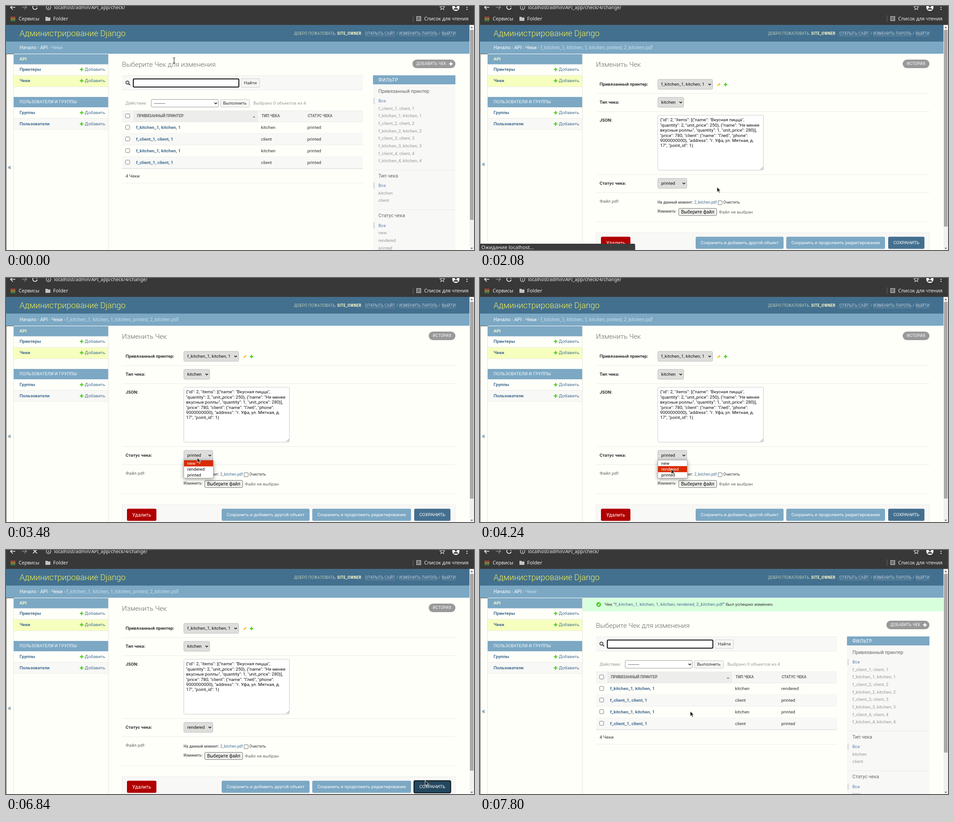
Write an HTML page that moves like this. It is 1033 px wide and 542 px high and loops after 8000 ms.

```html
<!DOCTYPE html>
<html lang="ru">
<head>
<meta charset="utf-8">
<title>Администрирование</title>
<style>
html, body { margin: 0; width: 100%; height: 100%; overflow: hidden; background: #fffffa; }
svg { display: block; width: 1033px; height: 542px; }
text { font-family: Roboto, sans-serif; white-space: pre; }
.ui { font-family: "Noto Sans", "Open Sans", sans-serif; }
.b { font-weight: 700; }
.l { font-weight: 300; }
.s { letter-spacing: .378px; }
.m { text-anchor: middle; }
</style>
</head>
<body>
<svg id="stage" viewBox="0 0 1033 542"></svg>
<script>
const K = 1033 / 1366; // page pixels to stage pixels
const HEAD = '#44708f', BLUE = '#7ca8c4', LINK = '#446e92', PALE = '#f8f8f6',
      LINE = '#ebebe8', DARK = '#333', GREY = '#666', DIM = '#999', PAGE = '#fffffa';

// y is the middle of the capital letters
const T = (x, y, s, fill = DARK, cls = '', n = 13, id = '') =>
  `<text id="${id}" x="${x}" y="${y + n * K * .355}" font-size="${n * K}" fill="${fill}" class="${cls}">${s}</text>`;
const U = (x, y, s, px, id = '') =>
  `<text id="${id}" x="${x}" y="${y + px * .36}" font-size="${px}" fill="#eee" class="ui">${s}</text>`;
const R = (x, y, x2, y2, fill, more = '') =>
  `<rect x="${x}" y="${y}" width="${x2 - x}" height="${y2 - y}" fill="${fill}" ${more}/>`;
const P = (d, stroke, w = 1, fill = 'none') =>
  `<path d="${d}" stroke="${stroke}" stroke-width="${w}" fill="${fill}"/>`;
const C = (x, y, r, fill, more = '') => `<circle cx="${x}" cy="${y}" r="${r}" fill="${fill}" ${more}/>`;
const G = (id, body) => `<g id="${id}">${body}</g>`;
const H = (x, x2, y, c = LINE) => P(`M${x} ${y}H${x2}`, c);
const plus = (x, y, c = '#58cf2c', r = 4) => P(`M${x - r} ${y}h${2 * r}M${x} ${y - r}v${2 * r}`, c, 2.4);
const chevron = (x, y) => P(`M${x - 2.8} ${y - 1.4}l2.8 2.8 2.8 -2.8`, '#222', 1.5);
const check = (x, y) => R(x - 4.5, y - 4.5, x + 4.5, y + 4.5, '#fff', 'rx="1.5" stroke="#777"');
const box = (x, y, x2, y2, fill, stroke, more = '') =>
  R(x + .5, y + .5, x2 - .5, y2 - .5, fill, `rx="2.5" stroke="${stroke}" ${more}`);

function chrome() {
  const colors = ['#e8503a', '#e9b93a', '#4caf50'];
  const dot = (c, i) => [0, 1, 2].map(j => R(10.5 + j * 3.6, 23.8 + i * 3.6, 13 + j * 3.6, 26.3 + i * 3.6, c)).join('');
  return R(0, 0, 1033, 42, '#383838') +
    P('M20.5 3H10.5M15 -2L10 3l5 5', '#eee', 1.6) + P('M35 3H45M40.5 -2L45.5 3l-5 5', '#888', 1.6) +
    G('reload', P('M69 3.5A5 5 0 1 1 67.5 -1', '#eee', 1.6) + P('M69.5 -3v4h-4z', 'none', 0, '#eee')) +
    G('stop', P('M59.5 -1.5l9 9M68.5 -1.5l-9 9', '#eee', 1.7)) +
    C(94, 3, 5, 'none', 'stroke="#ddd" stroke-width="1.2"') + P('M94 2v4M94 -.5v1.3', '#ddd', 1.3) +
    U(106, 3, '', 10.33, 'url') +
    P('M963 -2l1.5 3.5 3.8 .3 -2.9 2.5 .9 3.7 -3.3 -2 -3.3 2 .9 -3.7 -2.9 -2.5 3.8 -.3z', '#ddd', 1.1) +
    C(993, 3, 8, '#eee') + C(993, .8, 2.4, '#383838') + P('M988 8a5 3.6 0 0 1 10 0z', 'none', 0, '#383838') +
    C(1017.5, 3, 1.2, '#eee') + C(1017.5, 7.4, 1.2, '#eee') +
    colors.map(dot).join('') + U(28, 28, 'Сервисы', 10.6) +
    P('M87 24h4l1.5 1.5H98V33H87z', 'none', 0, '#c4c4c4') + U(104, 28, 'Folder', 11.2) +
    P('M898.5 20.5V36', '#666') + R(906.5, 23.5, 915.5, 32.5, 'none', 'stroke="#ddd" stroke-width="1.2"') +
    P('M908 26h2M911 26h3M908 28.2h2M911 28.2h3M908 30.4h2M911 30.4h3', '#ddd') +
    U(923, 28, 'Список для чтения', 10.6);
}

function header() {
  const user = (x, s, cls = 'l', c = '#ffc') => T(x, 61, s, c, 's ' + cls, 11);
  const link = (x, x2, s) => user(x, s, 'l', '#fff') + H(x, x2, 66.5, '#7394ab');
  return R(0, 42, 1023, 79, HEAD) + R(0, 79, 1023, 106, BLUE) +
    T(30, 61, 'Администрирование Django', '#eff25c', 'l', 24) +
    user(636, 'ДОБРО ПОЖАЛОВАТЬ,') + user(731, 'SITE_OWNER', 'b') + user(788, '.') +
    link(793, 859, 'ОТКРЫТЬ САЙТ') + user(862, '/') + link(868, 952, 'ИЗМЕНИТЬ ПАРОЛЬ') +
    user(955, '/') + link(962, 992, 'ВЫЙТИ');
}

function sidebar() {
  const item = (y, s) => T(30, y, s, LINK, 'b') + plus(167, y) + T(174, y, 'Добавить', LINK);
  return R(17, 107, 226, 129.5, BLUE) + T(30, 118, 'API', '#ffc', 'b s', 12) +
    R(17, 154, 226, 179.5, '#f6ffbe') + R(17, 202, 226, 225, BLUE) + R(17, 249, 226, 274, PALE) +
    T(30, 213, 'ПОЛЬЗОВАТЕЛИ И ГРУППЫ', '#fff', 's', 12) +
    [154, 179.5, 249.5, 274.5].map(y => H(17, 226, y)).join('') +
    item(141, 'Принтеры') + item(166, 'Чеки') + item(237, 'Группы') + item(262, 'Пользователи') +
    P('M16.5 107V542M226 107V542', '#e4e4e0') + P('M.5 542V106.5H17', '#555') +
    G('fold', T(4, 357, '«', LINK, '', 22));
}

function crumbs(tail) {
  const w = s => `<tspan fill="#fff">${s}</tspan>`;
  return T(30, 92, `${w('Начало')} › ${w('API')} › ${tail ? w('Чеки') + ' › ' + tail : 'Чеки'}`, '#c8dfea', '', 14);
}

function filters() {
  const printers = [1, 2, 3, 4].flatMap(i => [`f_client_${i}, client, ${i}`, `f_kitchen_${i}, kitchen, ${i}`]);
  const part = (y, name, items) => T(822, y, name, GREY, '', 14) +
    R(811, y + 15, 814, y + 29, '#ddd') +
    ['Все', ...items].map((s, i) => T(822, y + 21.7 + i * 16.65, s, i ? DIM : '#5a7fae')).join('');
  return R(810, 154, 992, 560, PALE) + R(810, 154, 992, 174, BLUE) + T(822, 164, 'ФИЛЬТР', '#fff', 's', 14) +
    part(189, 'Привязанный принтер', printers) + H(810, 992, 364.5) +
    part(377, 'Тип чека', ['kitchen', 'client']) + H(810, 992, 452.5) +
    part(465.5, 'Статус чека', ['new', 'rendered', 'printed']);
}

function list() {
  const row = i => {
    const y = 270 + i * 25.8, kind = i % 2 ? 'client' : 'kitchen';
    return (i % 2 ? R(256, y - 13, 788, y + 12.8, PALE) : '') + H(256, 788, y + 13) + check(268.5, y - .5) +
      T(287, y, `f_${kind}_1, ${kind}, 1`, LINK, 'b', 13, 'link' + i) +
      T(563, y, kind) + T(665, y, 'printed', DARK, '', 13, 'state' + i);
  };
  const th = (x, s) => T(x, 244.5, s, GREY, 'b', 11);
  return T(256, 130, 'Выберите Чек для изменения', GREY, 'l', 20) +
    R(897, 119, 992, 138, DIM, 'rx="9.5"') + T(906, 128.5, 'ДОБАВИТЬ ЧЕК', '#fff', 's', 11) + plus(982, 128.5, '#fff') +
    R(256, 154, 788, 187, PALE) + H(256, 788, 154.5) + H(256, 788, 186.5) +
    C(268, 170, 3.4, 'none', 'stroke="#444" stroke-width="1.8"') + P('M270.5 172.5l3.5 3.5', '#444', 2.2) +
    box(281, 162, 514, 180, '#fff', '#ccc') + G('ring', R(281, 162, 514, 180, 'none', 'rx="2" stroke="#111" stroke-width="2"')) +
    G('caret', P('M285.5 165.5V177', '#222')) +
    box(518, 161, 560, 181, '#f6f6f4', '#ccc') + T(525, 171, 'Найти') +
    T(264, 216, 'Действие:', DIM) + box(320, 207, 469, 225, '#fff', '#999') + T(327, 216, '---------', '#111') + chevron(463, 216) +
    box(473, 207, 538, 225, '#f6f6f4', '#ccc', 'id="run"') + T(479, 216, 'Выполнить') +
    T(546, 216, 'Выбрано 0 объектов из 4', DIM) +
    R(256, 232, 788, 257, '#f6f6f4') + R(281, 232, 556, 257, '#ededeb') + H(256, 788, 232.5) + H(256, 788, 257.5) +
    check(268.5, 244) + th(289, 'ПРИВЯЗАННЫЙ ПРИНТЕР') + th(564, 'ТИП ЧЕКА') + th(666, 'СТАТУС ЧЕКА') +
    P('M544.5 248l3 -4 3 4z', 'none', 0, DIM) +
    [0, 1, 2, 3].map(row).join('') + H(256, 788, 361.5, '#ddd') + T(264, 377.5, '4 Чеки') + H(256, 788, 393.5) + filters();
}

function form() {
  const label = (y, s) => T(264, y, s, DARK, 'b');
  const select = (y, x2, s, id) => box(392, y - 11.5, x2, y + 11.5, '#dededc', '#bbb') +
    T(400, y, s, '#111', '', 13, id) + chevron(x2 - 7, y);
  const button = (x, x2, s, c, n = 13) => R(x, 512.5, x2, 539.5, c, 'rx="3"') + T((x + x2) / 2, 526, s, '#fff', 'm', n);
  const json = ['{"id": 2, "items": [{"name": "Вкусная пицца",', '"quantity": 2, "unit_price": 250}, {"name": "Не менее',
    'вкусные роллы", "quantity": 1, "unit_price": 280}],', '"price": 780, "client": {"name": "Глеб", "phone":',
    '9000000000}, "address": "г. Уфа, ул. Мятная, д.', '17", "point_id": 1}'];
  return T(256, 130, 'Изменить Чек', GREY, 'l', 20) +
    R(933, 119, 992, 138, DIM, 'rx="9.5"') + T(942, 128.5, 'ИСТОРИЯ', '#fff', 's', 11) +
    [194.5, 234.5, 374.5, 414.5, 479.5].map(y => H(256, 992, y)).join('') +
    label(174, 'Привязанный принтер:') + select(174, 514, 'f_kitchen_1, kitchen, 1') +
    P('M524 178l1 -3 4 -4 2 2 -4 4z', 'none', 0, '#e9c91c') + plus(542, 174.5) +
    label(214, 'Тип чека:') + select(214, 450, 'kitchen') +
    label(254, 'JSON:') + box(392, 242, 626, 365, '#fff', '#ccc') + P('M619 363.5l6 -6M622.5 363.5l2.5 -2.5', '#777') +
    json.map((s, i) => T(397.5, 253 + i * 11.34, s, '#111')).join('') +
    label(394, 'Статус чека:') + select(394, 457, 'printed', 'value') +
    G('focus', R(393, 383, 457, 405, 'none', 'rx="2.5" stroke="#111" stroke-width="2"')) +
    T(264, 434, 'Файл pdf:', GREY) + T(392, 436.5, 'На данный момент:', GREY, 'b', 11) +
    T(473, 436.5, '2_kitchen.pdf', LINK, '', 11) + check(530, 437) + T(537, 436.5, 'Очистить', DARK, '', 11) +
    T(392, 456, 'Изменить:', GREY, 'b', 11) + box(438, 449, 523, 466, '#efefed', '#777') +
    T(480.5, 457.5, 'Выберите файл', '#111', 'm', 13.333) + T(527, 458, 'Файл не выбран', GREY) +
    R(256.5, 503.5, 991.5, 560, PALE, `stroke="${LINE}"`) + button(267, 332, 'Удалить', '#b00000', 14) +
    button(476, 670, 'Сохранить и добавить другой объект', BLUE) +
    button(676, 894, 'Сохранить и продолжить редактирование', BLUE) +
    G('save', button(901, 981, 'СОХРАНИТЬ', HEAD)) +
    G('saveRing', R(900.5, 512.5, 981.5, 539.5, 'none', 'rx="3" stroke="#0b141a" stroke-width="2"')) +
    G('menu', R(392.5, 404.5, 457.5, 444.5, '#fff', 'stroke="#aaa" style="filter:drop-shadow(0 2px 4px #0006)"') +
      R(393, 405, 457, 418.5, '#d92b00', 'id="mark"') +
      ['new', 'rendered', 'printed'].map((s, i) => T(400, 411.7 + i * 12.8, s, '#111', '', 13, 'opt' + i)).join(''));
}

const stage = document.getElementById('stage');
stage.innerHTML = R(0, 0, 1033, 542, PAGE) + sidebar() + header() +
  G('list', crumbs('') + G('listBody', list())) +
  G('change', crumbs('f_kitchen_1, kitchen, 1, kitchen, printed, 2_kitchen.pdf') + form()) +
  G('banner', R(227, 107, 1023, 136, '#d8ffdc') + C(262, 121, 5.2, '#4cc928') + P('M259.5 121l2 2 3.2 -4', '#fff', 1.5) +
    T(275, 121, `Чек “<tspan fill="${LINK}">f_kitchen_1, kitchen, 1, kitchen, rendered, 2_kitchen.pdf</tspan>” был успешно изменен.`)) +
  R(1023, 42, 1033, 542, '#f1f1ef') + R(1024, 53, 1032, 475, '#a8a8a8', 'id="thumb"') +
  P('M1025.5 49l2.5 -3 2.5 3zM1025.5 537l2.5 3 2.5 -3z', 'none', 0, '#555') + chrome() +
  G('status', R(-4, 528, 231, 548, '#3b3b3b', 'id="tip" rx="3"') + U(3, 536.5, '', 11.1, 'tipText')) +
  G('cursor',
    G('beam', P('M-2.5 -6q2.5 0 2.5 1.5q0 -1.5 2.5 -1.5M0 -4.5V5M-2.5 6q2.5 0 2.5 -1.5q0 1.5 2.5 1.5', '#222', 1.1)) +
    G('hand', P('M-2 -5q1.5 -1.5 2.6 0V-.5l4.6 1q1.3 .5 1.3 2V5L5.5 9H-1L-5 3.5q0 -1.8 1.5 -1.3L-2 3.5z', '#111', 1.1, '#fff')) +
    G('arrow', P('M0 0V11.5L2.7 9l2 4.3 2 -.9 -2 -4.2H8.2z', '#fff', .9, '#222')));

const el = id => document.getElementById(id);
const show = (id, on) => { el(id).style.display = on ? 'inline' : 'none'; };
const set = (id, name, v) => el(id).setAttribute(name, v);
const within = (t, a, b) => t >= a && t < b;

const PATH = [ // ms, x, y
  [0, 371, 121], [160, 371, 121], [400, 478, 204], [520, 484, 216], [760, 337, 272], [1640, 337, 272],
  [1680, 360, 277], [1800, 360, 277], [1840, 395, 305], [2080, 523, 402], [2280, 523, 402], [2880, 422, 399],
  [3480, 422, 399], [3960, 428, 425], [4120, 428, 425], [4240, 422, 424], [4800, 422, 424], [5120, 780, 447],
  [5280, 780, 447], [5440, 855, 476], [5640, 860, 480], [5960, 992, 525], [6160, 951, 520], [6320, 951, 520],
  [6440, 945, 516], [6640, 945, 516], [6800, 925, 512], [6920, 925, 512], [7480, 640, 430], [7800, 464, 358], [8000, 464, 358]];

function cursorAt(t) {
  const i = PATH.findIndex(p => p[0] > t), [a, b] = [PATH[i - 1], PATH[i]];
  const f = (t - a[0]) / (b[0] - a[0]);
  return [a[1] + (b[1] - a[1]) * f, a[2] + (b[2] - a[2]) * f];
}

function draw(t) {
  const [x, y] = cursorAt(t), change = within(t, 1840, 7120), done = t >= 7120;
  const over = (x1, y1, x2, y2) => x >= x1 && x <= x2 && y >= y1 && y <= y2;

  show('list', !change);
  show('change', change);
  show('banner', done);
  el('state0').textContent = done ? 'rendered' : 'printed';
  set('listBody', 'transform', `translate(0 ${done ? 38 : 0})`);
  set('fold', 'transform', `translate(0 ${change ? -7 : 0})`);
  set('thumb', 'height', change ? 437 : done ? 397 : 422);

  const loading = within(t, 1120, 2080) || within(t, 6360, 7480);
  show('stop', loading);
  show('reload', !loading);
  el('url').textContent = 'localhost/admin/API_app/check/' + (within(t, 1680, 7080) ? '4/change/' : '');
  const waiting = within(t, 1440, 2400) || within(t, 6880, 7560);
  show('status', waiting || within(t, 760, 1440));
  set('tip', 'width', waiting ? 346.5 : 235);
  el('tipText').textContent = waiting ? 'Ожидание localhost…' : 'localhost/admin/API_app/check/4/change/';

  set('link0', 'fill', within(t, 720, 1840) ? '#0a1f55' : LINK);
  set('run', 'stroke', t < 1840 && over(473, 207, 538, 225) ? '#888' : '#ccc');
  show('ring', t < 960 || done);
  show('caret', within(t, 480, 960) || within(t, 7120, 7640));

  const pick = t < 3440 ? 2 : t < 3640 ? 0 : 1;
  show('menu', within(t, 3160, 4560));
  set('mark', 'y', 405 + pick * 12.8);
  for (let i = 0; i < 3; i++) set('opt' + i, 'fill', i === pick ? '#fff' : '#111');
  el('value').textContent = t < 4560 ? 'printed' : 'rendered';
  show('focus', within(t, 4560, 6160));
  show('saveRing', t >= 6160);
  el('save').firstChild.setAttribute('fill', over(901, 511, 981, 540) ? '#24485e' : HEAD);

  set('cursor', 'transform', `translate(${x} ${y})`);
  show('cursor', !within(t, 5440, 5680));
  const beam = t < 320, hand = within(t, 720, 1680);
  show('beam', beam);
  show('hand', hand);
  show('arrow', !beam && !hand);
}

const start = performance.now();
function tick() {
  const t = (performance.now() - start) % 8000;
  draw(Math.floor(t / 40) * 40);
  requestAnimationFrame(tick);
}
tick();
</script>
</body>
</html>
```
